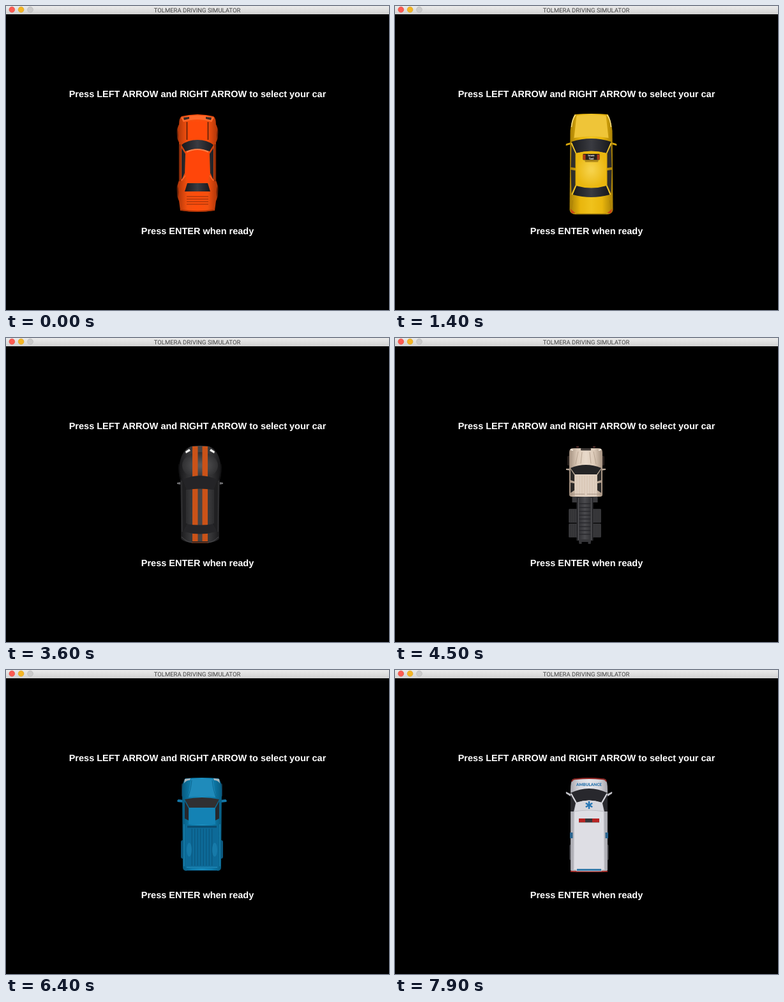
An HTML page for the animation above (8000 ms loop, 600 by 477 pixels).

```html
<!DOCTYPE html>
<html lang="en">
<head>
<meta charset="utf-8">
<title>Car selection</title>
<style>
  html, body { margin: 0; width: 100%; height: 100%; overflow: hidden; background: #000; }
  svg { display: block; width: 100vw; height: 100vh; }
  .title { font: 9.5px Roboto, sans-serif; fill: #444; }
  .prompt { font: bold 14.5px "Liberation Sans", Arial, sans-serif; fill: #fff; }
  .badge { font: 900 9.8px Lato, sans-serif; }
  .car { visibility: hidden; }
  text { text-anchor: middle; text-rendering: geometricPrecision; }
</style>
</head>
<body>
<svg id="stage" viewBox="0 0 600 477" xmlns="http://www.w3.org/2000/svg">
  <defs id="defs"></defs>
  <rect width="600" height="477"/>
  <rect width="600" height="13" fill="url(#bar)"/>
  <g stroke-width=".6">
    <circle cx="9.3" cy="5.7" r="4.4" fill="#fc5b52" stroke="#dd453d"/>
    <circle cx="23.6" cy="5.7" r="4.4" fill="#f4b625" stroke="#d79b1c"/>
    <circle cx="38" cy="5.7" r="4.4" fill="#cbcbcb" stroke="#b2b2b2"/>
  </g>
  <text class="title" x="299.5" y="9.5">TOLMERA DRIVING SIMULATOR</text>
  <text class="prompt" x="300" y="143">Press LEFT ARROW and RIGHT ARROW to select your car</text>
  <text class="prompt" x="300" y="358">Press ENTER when ready</text>
  <g id="cars"></g>
</svg>
<script>
const PERIOD = 8000;
const schedule = [
  [0, 'coupe'], [1400, 'taxi'], [2200, 'police'], [3000, 'striped'],
  [3800, 'truck'], [5900, 'pickup'], [6700, 'ambulance']
];

const gradient = (id, colors, across = true) =>
  `<linearGradient id="${id}" x2="${across ? 1 : 0}" y2="${across ? 0 : 1}">` +
  colors.map((c, i) => `<stop offset="${i / (colors.length - 1)}" stop-color="${c}"/>`).join('') +
  '</linearGradient>';

const glow = (id, inner, outer) =>
  `<radialGradient id="${id}"><stop offset=".1" stop-color="${inner}"/>` +
  `<stop offset="1" stop-color="${outer}"/></radialGradient>`;

document.getElementById('defs').innerHTML =
  gradient('bar', ['#ebebeb', '#d2d2d2'], false) +
  gradient('orange', ['#a93408', '#f5500f', '#ff4d0c', '#f5500f', '#a93408']) +
  gradient('glass', ['#17181c', '#3a3b41', '#17181c']) +
  gradient('yellow', ['#a77f06', '#e9b60d', '#f0c21c', '#e9b60d', '#a77f06']) +
  glow('yellowRoof', '#f6d24a', '#eab70f') +
  gradient('black', ['#161618', '#353537', '#464648', '#353537', '#161618']) +
  glow('blackHood', '#59595b', '#303032') +
  glow('whiteRoof', '#8d8a8a', '#dedcdc') +
  gradient('beige', ['#a49180', '#ddcbb9', '#e8d9ca', '#ddcbb9', '#a49180']) +
  gradient('steel', ['#29292c', '#4a4a4e', '#29292c']) +
  gradient('blue', ['#075b80', '#0f7fb0', '#1a8dbe', '#0f7fb0', '#075b80']) +
  gradient('white', ['#a6a6ad', '#d9d9df', '#e5e5ea', '#d9d9df', '#a6a6ad']);

const path = (d, fill) => `<path d="${d}" fill="${fill}"/>`;
const line = (d, stroke, width = 1) =>
  `<path d="${d}" fill="none" stroke="${stroke}" stroke-width="${width}"/>`;
const box = (x, y, w, h, fill, r = 0) =>
  `<rect x="${x}" y="${y}" width="${w}" height="${h}" rx="${r}" fill="${fill}"/>`;
const rows = (count, draw) => Array.from({ length: count }, (_, i) => draw(i)).join('');
// Draws the left side as given and repeats it on the right.
const pair = side => side + `<g transform="scale(-1 1)">${side}</g>`;

const cars = {
  coupe: [300,
    path('M0 170L13 171L25 173Q29 176 29 186Q32 190 32 200Q32 209 29 214L29 274Q32 280 32 290Q32 300 29 306L27 321Q0 325 -27 321L-29 306Q-32 300 -32 290Q-32 280 -29 274L-29 214Q-32 209 -32 200Q-32 190 -29 186Q-29 176 -25 173L-13 171Z', 'url(#orange)') +
    path('M-26 175Q0 168 26 175L22 182Q0 174 -22 182Z', '#ff6a2c') +
    path('M-14 181H14L16 211Q0 207 -16 211Z', '#ff4a0a') +
    path('M-25 218Q-15 210 0 210Q15 210 25 218L19 228Q0 221 -19 228Z', 'url(#glass)') +
    path('M-18 229Q0 220 18 229L19 262L16 277H-16L-19 262Z', '#ff460a') +
    line('M-17 229Q0 221 17 229', '#ff8048', 2.2) +
    path('M-16 278H16L20 291H-20Z', 'url(#glass)') +
    rows(4, i => line(`M-17 ${299 + i * 4}H17`, '#8e2d0a', 1.1)) +
    line('M-26 320Q0 324 26 320', '#a83105', 1.5) +
    pair(path('M-22 175L-13 174L-13 177L-21 179Z', '#3b2923') +
      line('M-16.5 182V210', '#5b1d08', 1.6) +
      path('M-25 223L-19 232L-20 262L-25 273Z', '#24252a') +
      line('M-27.5 217V275', '#5b1d08', 1.3) +
      line('M-25 274L-19 266', '#ff662c', 1.5) +
      path('M-32 192Q-29 200 -31 211Q-33 201 -32 192ZM-32 280Q-28 290 -31 302Q-33 291 -32 280Z', '#642007'))],

  taxi: [307.5,
    pair(path('M-32 214L-39 216Q-41 219 -39 219L-32 217Z', '#d7a60c')) +
    path('M-26 170Q0 168 26 170Q31 178 33 196L34 320Q33 327 24 327H-24Q-33 327 -34 320L-33 196Q-31 178 -26 170Z', 'url(#yellow)') +
    path('M-23 172Q0 169 23 172L27 207Q0 202 -27 207Z', '#efc538') +
    path('M-31 213Q0 203 31 213L24 231Q0 225 -24 231Z', 'url(#glass)') +
    path('M-24 231Q0 224 24 231L24 283Q0 288 -24 283Z', 'url(#yellowRoof)') +
    path('M-24 282Q0 289 24 282L29 296Q0 304 -29 296Z', 'url(#glass)') +
    pair(path('M-31 218L-25 231L-25 254L-32 253ZM-32 257L-25 258L-25 281L-31 294Z', '#2e2d2b') +
      line('M-31 215L-24 231M-24 282L-30 296', '#f5cb30', 1.6) +
      line('M-25 171Q-30 178 -31 190', '#f7e18a', 1.5) +
      line('M-29 305L-31 320', '#ad8307', 1) +
      path('M-33 318L-25 325L-31 325Z', '#c94318')) +
    line('M-24 326.5H24', '#8c6b08', 1.3) +
    box(-10, 241, 21, 4, '#b48d1b', 1.5) +
    box(-13, 232, 26, 9.5, '#27211d', 1) +
    box(-13, 233, 4, 8, '#af3a16') + box(9, 233, 4, 8, '#af3a16') +
    '<g font-family="Lato, sans-serif" font-weight="900" font-size="4.4" fill="#eee"><text y="236.3">town</text><text y="240.7">Taxi</text></g>'],

  police: [302,
    path('M-16 170H16Q31 176 34 198Q36 210 33 216L29 220V276Q34 281 33 294L31 314Q27 322 12 322H-12Q-27 322 -31 314L-33 294Q-34 281 -29 276V220L-33 216Q-36 210 -34 198Q-31 176 -16 170Z', 'url(#black)') +
    '<ellipse cy="192" rx="27" ry="22" fill="url(#blackHood)"/>' +
    path('M-28 217Q0 205 28 217L20 229Q0 224 -20 229Z', '#202023') +
    path('M-19 280Q0 284 19 280L25 291Q0 300 -25 291Z', '#1d1d20') +
    path('M-19 229Q0 224 19 229Q22 254 19 279Q0 283 -19 279Q-22 254 -19 229Z', 'url(#whiteRoof)') +
    pair(path('M-22 175L-16 171L-13 175Q-18 175 -22 179Z', '#eee') +
      path('M-27 220L-21 230L-22 277L-25 276Z', '#242427') +
      line('M-28 217L-25 276', '#d0cece', 2.2) +
      line('M-28 218L-20 230M-20 279L-25 293', '#c4c2c2', 1.7) +
      line('M-32 289Q-30 312 -20 319', '#4a4a4c', 1)) +
    box(-17, 235, 11.5, 6, '#bd3024') + box(-5.5, 235, 11.5, 6, '#c9c9cb') +
    box(6, 235, 11.5, 6, '#1c6da6') + line('M-17 241H17.5', '#555', .8) +
    '<g class="badge" stroke-width=".4"><text fill="#b9b9b9" stroke="#b9b9b9" x="-.5" y="-197" transform="scale(-1)">POLICE</text>' +
    '<text fill="#e3e3e3" stroke="#e3e3e3" x=".5" y="309.5">POLICE</text></g>'],

  striped: [304,
    pair(path('M-30 226L-36 227L-36 229L-30 230Z', '#707073')) +
    path('M-14 170Q0 168 14 170Q28 175 32 196Q35 211 31 223L30 280L30 315Q24 322 0 322Q-24 322 -30 315L-30 280L-31 223Q-35 211 -32 196Q-28 175 -14 170Z', 'url(#black)') +
    '<ellipse cy="200" rx="28" ry="21" fill="url(#blackHood)"/>' +
    pair(box(-12, 170, 8.5, 149, '#ca5218')) +
    path('M-13 319H13V322H-13Z', '#29292b') +
    path('M-27 222Q0 210 27 222L20 238Q0 235 -20 238Z', '#242427') +
    path('M-20 292Q0 295 20 292L25 304Q0 311 -25 304Z', '#252528') +
    pair(path('M-23 178L-17 174L-15 177L-22 181Z', '#f2f2ef') +
      path('M-28 222L-20 239L-20 292L-27 304Z', '#202022') +
      line('M-21 238V291', '#3d3d3f', 1) +
      line('M-29 224L-28 304', '#464648', .8) +
      line('M-33 198Q-34 211 -30 222', '#101011', 1.5) +
      line('M-29 312Q-20 321 -12 321', '#4b4b4e', 1)) +
    line('M-13 321H13', '#7d3514', 1.2)],

  truck: [299,
    `<g transform="translate(-1.5 0)">` +
    pair(box(-20, 249, 8, 9, '#3a3a3d') +
      box(-25.5, 268, 14, 22, '#303033', 1.5) + box(-25.5, 291, 14, 22, '#303033', 1.5) +
      rows(4, i => line(`M${-23.5 + i * 3} 269V289M${-23.5 + i * 3} 292V312`, '#47474a', .8))) +
    box(-13, 249, 26, 69, 'url(#steel)') +
    path('M-10 316H10L9 323H5V320H-5V323H-9Z', '#353538') +
    rows(9, i => line(`M-9 ${260 + i * 6}H9`, '#28282b', 1.4)) +
    line('M-10 251V317M10 251V317', '#66666a', .8) + '</g>' +
    pair(box(-29, 185, 5, 15, '#29211e', 1.5) +
      path('M-24 205L-31 205L-31 207L-24 208Z', '#b9a899') +
      box(-15, 170, 4, 2, '#56302d')) +
    path('M-21 173H21Q26 173 26 180V246Q26 249 22 249H-22Q-26 249 -26 246V180Q-26 173 -21 173Z', 'url(#beige)') +
    box(-8, 173, 16, 3.5, '#403a37', 1) +
    path('M-24 204Q0 194 24 204L17 214H-17Z', '#242426') +
    path('M-17 214H17V248H-17Z', '#e0d0c1') +
    rows(8, i => line(`M${-14 + i * 4} 216V247`, '#d0bcaa', .7)) +
    pair(path('M-24 206L-18 215V225L-24 223ZM-24 227L-18 228V239L-24 243Z', '#2b2928') +
      line('M-6 179L-8 197M-12 178L-16 198', '#b5a18f', .9) +
      line('M-24 175L-20 176', '#f9eee0', 2) +
      line('M-24 245H-2', '#9d8c7d', .9))],

  pickup: [307,
    pair(path('M-29 204L-37 203Q-40 205 -38 207L-29 208Z', '#1377a8') +
      box(-33, 267, 8, 29, '#0c587f', 3) + box(-32, 178, 4, 21, '#123044', 2)) +
    path('M-26 170Q0 168 26 170Q31 176 31 188L30 310Q30 315 24 315H-24Q-30 315 -30 310L-31 188Q-31 176 -26 170Z', 'url(#blue)') +
    path('M-17 171H17L22 200Q0 195 -22 200Z', '#1f8bbb') +
    path('M-27 203Q0 197 27 203L20 216H-20Z', '#302f31') +
    path('M-20 216H20L21 242H-21Z', '#1482b4') +
    path('M-24 244H24Q26 244 26 248V308Q26 311 23 311H-23Q-26 311 -26 308V248Q-26 244 -24 244Z', '#0d6a98') +
    rows(8, i => line(`M${-15.75 + i * 4.5} 249V307`, '#0a5176', .9)) +
    line('M-23 246H23', '#0a4c70', 3) +
    pair(path('M-27 206L-21 217L-21 236L-27 233Z', '#25272c') +
      '<ellipse cx="-20" cy="282" rx="4" ry="11" fill="#167aa9"/>' +
      path('M-27 171L-18 170L-19 173Q-25 173 -28 178Z', '#a9b6bd') +
      line('M-16 173Q-18 190 -22 200', '#0b6690', 1) +
      line('M-28 242V308', '#218fc0', 1)) +
    line('M-24 309.5H24', '#2293c2', 1) + line('M-24 314.5H24', '#084667', 1)],

  ambulance: [304,
    pair(path('M-28 195L-36 191Q-37 194 -34 195L-28 199Z', '#c2c2c8') +
      box(-31, 274, 4, 24, '#36363a', 1.5)) +
    path('M-25 171Q0 168 25 171Q29 174 29 188L29 314Q27 317 23 317H-23Q-27 317 -29 314L-29 188Q-29 174 -25 171Z', 'url(#white)') +
    line('M-27 175Q-26 171 -20 171Q0 169 20 171Q26 171 27 175', '#8c211e', 1.8) +
    path('M-29 193Q0 179 29 193L20 208Q0 201 -20 208Z', '#28282d') +
    path('M-20 208Q0 201 20 208L23 222H-23Z', '#d7d7dd') +
    path('M-23 222Q0 217 23 222L24 313H-24Z', '#dedee4') +
    line('M-23 222Q0 218 23 222', '#b2b2b9', .7) +
    pair(path('M-29 195L-21 209L-24 222H-29Z', '#29292e') +
      line('M-28 194L-20 208', '#dddde2', 1.6) +
      line('M-24 223V312', '#b8b8bf', .7) +
      box(-30, 255, 4.5, 9, '#2b6590') +
      line('M-29 316H-20', '#a72824', 1.8)) +
    box(-19, 312, 38, 3, '#387dac') + line('M-21 316.5H21', '#942724', 1.3) +
    rows(3, i => `<path d="M0 206V218" stroke="#2676b5" stroke-width="2.5" transform="rotate(${i * 60} 0 212)"/>`) +
    box(-16, 233, 32, 6, '#b82222') + box(-6, 233, 11, 6, '#36363a') +
    line('M-16 239.3H16', '#888', .8) +
    '<text class="badge" y="182.3" fill="#2773ad" style="font-size:6.3px">AMBULANCE</text>']
};

document.getElementById('cars').innerHTML = Object.entries(cars)
  .map(([name, [x, art]]) => `<g class="car" id="${name}" transform="translate(${x} 0)">${art}</g>`)
  .join('');

let shown;
const start = performance.now();
function show(now) {
  const time = Math.max(0, now - start) % PERIOD;
  const [, name] = schedule.findLast(([at]) => at <= time);
  if (name !== shown) {
    if (shown) document.getElementById(shown).style.visibility = 'hidden';
    document.getElementById(name).style.visibility = 'visible';
    shown = name;
  }
  requestAnimationFrame(show);
}
show(start);
</script>
</body>
</html>
```
